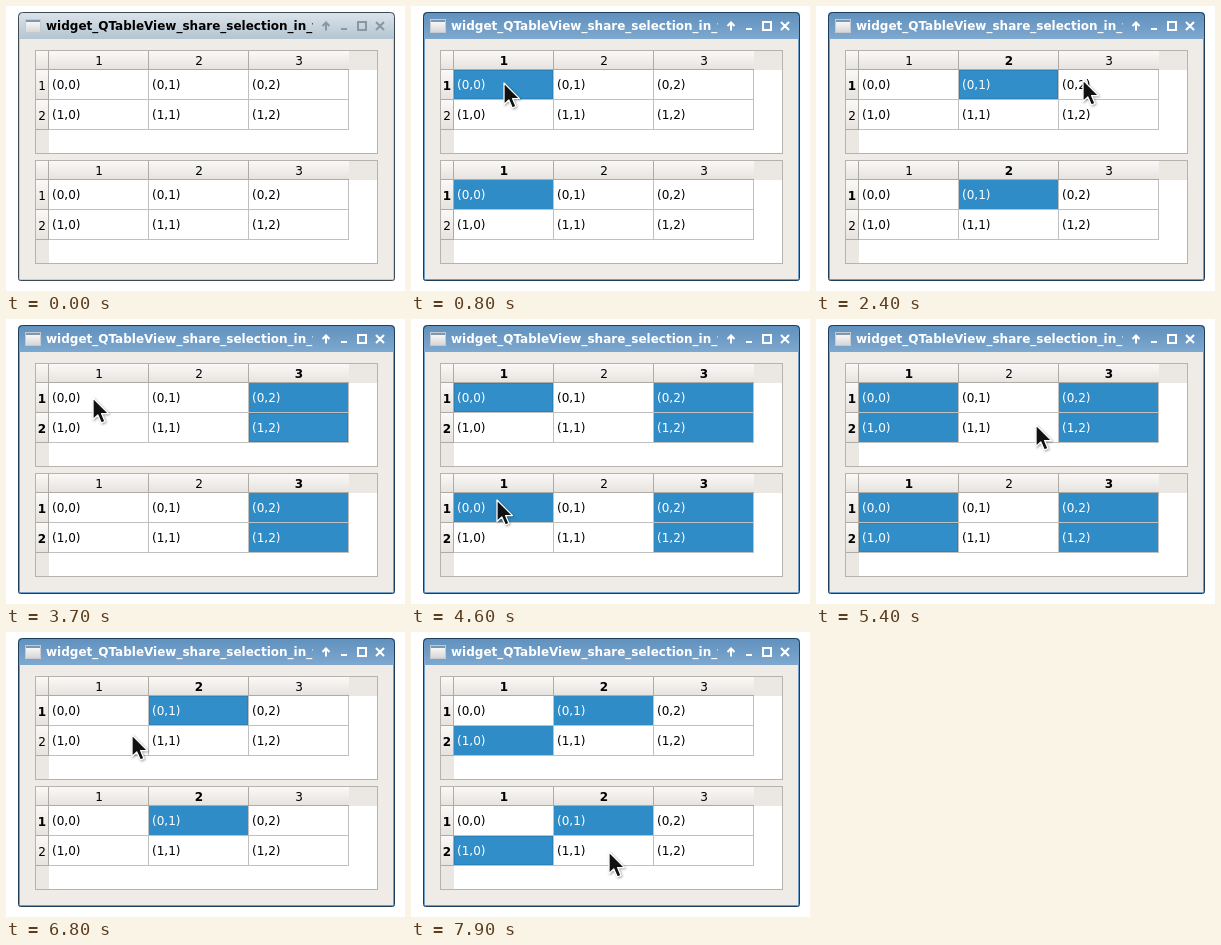
An HTML page for the animation above (8 s loop, 399 by 285 pixels).

```html
<!DOCTYPE html>
<html lang="en">
<head>
<meta charset="utf-8">
<title>Shared selection</title>
<style>
html, body { margin: 0; width: 100%; height: 100%; overflow: hidden; background: #fff; }
svg { display: block; }
text { font: 12px "DejaVu Sans", sans-serif; fill: #000; }
.mid { text-anchor: middle; }
.bold { font-weight: bold; }
.cell { fill: #fff; }
.sel .cell { fill: #308cc6; }
.sel text { fill: #fff; }
.focus .rect, .ring { fill: none; stroke: none; }
.focus .cell { fill: #328ec8; }
.focus .ring { stroke: #2b82ba; }
.frame { fill: none; stroke: #b6b2ae; }
.grid { fill: none; stroke: #c0c0c0; }
.edge { fill: none; stroke: #aeaaa6; }
.bar { fill: url(#idle); }
.rim { fill: none; stroke: #3e4a54; }
.inner { fill: none; stroke: #c3d0da; }
.title { font-weight: bold; fill: #000; }
.btn { fill: none; stroke: #8798a5; stroke-width: 2; }
.active .bar { fill: url(#live); }
.active .rim { stroke: #1e3d5a; }
.active .inner { stroke: #6f9fca; }
.active .title { fill: #fff; }
.active .btn { stroke: #fff; }
#cursor { filter: drop-shadow(1px 1px 1px rgba(0, 0, 0, .35)); }
</style>
</head>
<body>
<svg width="399" height="285" viewBox="0 0 399 285">
  <defs>
    <linearGradient id="idle" x2="0" y2="1">
      <stop stop-color="#dce4ea"/><stop offset="1" stop-color="#b3c5d2"/>
    </linearGradient>
    <linearGradient id="live" x2="0" y2="1">
      <stop stop-color="#5f90bd"/><stop offset="1" stop-color="#7ea8cf"/>
    </linearGradient>
    <linearGradient id="head" x2="0" y2="1">
      <stop stop-color="#faf9f7"/><stop offset="1" stop-color="#e6e2de"/>
    </linearGradient>
    <linearGradient id="pane" x2="0" y2="1">
      <stop stop-color="#fff"/><stop offset="1" stop-color="#d5d5d5"/>
    </linearGradient>
    <clipPath id="caption"><rect x="38" y="8" width="269" height="24"/></clipPath>
  </defs>
  <g id="win">
    <path fill="#efebe7" d="M12 33H389V273Q389 275 387 275H14Q12 275 12 273Z"/>
    <path class="bar" d="M12 33V10Q12 6 16 6H385Q389 6 389 10V33Z"/>
    <path class="inner" d="M13.5 33V273.5H387.5V33"/>
    <path class="rim" d="M12.5 272.5V10.5Q12.5 6.5 16.5 6.5H384.5Q388.5 6.5 388.5 10.5V272.5Q388.5 274.5 386.5 274.5H14.5Q12.5 274.5 12.5 272.5Z"/>
    <rect x="19.5" y="13.5" width="15" height="13" fill="url(#pane)" stroke="#c6cace"/>
    <path d="M20 15H34" stroke="#7f97ad" stroke-width="2"/>
    <g clip-path="url(#caption)">
      <text class="title" x="40" y="24">widget_QTableView_share_selection_in_two_views</text>
    </g>
    <path class="btn" d="M320 24.5V17M316.5 20L320 16.5L323.5 20M335 23H341M352 16H360V24H352ZM370 16L378 24M378 16L370 24"/>
    <g id="tables"></g>
  </g>
  <path id="cursor" d="M1 1V22.5L5.8 18L9.3 26L13 24.4L9.6 16.6H16.5Z" fill="#111" stroke="#fff" stroke-width="1.3" stroke-linejoin="round"/>
</svg>
<script>
const LOOP = 8000, STEP = 100, ACTIVATE = 700;

// time, x, y
const path = [
  [100, 200, 170], [700, 92, 76], [800, 92, 76], [1000, 96, 102],
  [1300, 96, 102], [1500, 160, 80], [1600, 182, 82],
  [1900, 182, 82], [2400, 266, 73], [2700, 266, 73], [2800, 274, 95],
  [3000, 274, 95], [3400, 79, 88], [3500, 79, 88], [3700, 86, 78],
  [4100, 86, 78], [4900, 85, 211], [5000, 85, 212], [5400, 219, 105],
  [5700, 219, 105], [6300, 187, 82], [6500, 187, 82], [6800, 125, 102],
  [7400, 66, 224], [7700, 66, 224], [7900, 197, 219]
];

// time, selected cells (row and column), focused table and cell
const picks = [
  [0, "", ""],
  [ACTIVATE, "00", "0:00"],
  [1100, "10", "0:10"],
  [1800, "01", "0:01"],
  [2800, "02 12", "0:12"],
  [4100, "02 12 00", "0:00"],
  [5000, "02 12 00 10", "1:10"],
  [5600, "02 12 00 10 11", "0:11"],
  [6400, "01", "0:01"],
  [7600, "01 10", "1:10"]
];

const byId = id => document.getElementById(id);
const label = (kind, n, x, y) =>
  `<text class="mid" data-${kind}="${n}" x="${x}" y="${y}">${n + 1}</text>`;

function table(n) {
  let out = `<g transform="translate(0 ${n * 110})">
    <rect x="29" y="44" width="343" height="104" fill="#fff"/>
    <path fill="#ebe7e3" d="M30 45H371V64H43V147H30Z"/>
    <rect x="30" y="45" width="313" height="19" fill="url(#head)"/>`;
  for (let r = 0; r < 2; r++) {
    const y = 64 + r * 30;
    out += `<rect x="30" y="${y}" width="13" height="30" fill="url(#head)"/>`;
    for (let c = 0; c < 3; c++) {
      const x = 43 + c * 100;
      out += `<g data-cell="${r}${c}" data-table="${n}">
        <rect class="cell" x="${x}" y="${y}" width="99" height="29"/>
        <rect class="ring" x="${x + .5}" y="${y + .5}" width="98" height="28"/>
        <text x="${x + 3}" y="${y + 19}">(${r},${c})</text></g>`;
    }
    out += label("row", r, 36, y + 20);
  }
  for (let c = 0; c < 3; c++) out += label("col", c, 93 + c * 100, 59);
  return out + `
    <path class="grid" d="M43 93.5H343M43 123.5H343M142.5 64V124M242.5 64V124M342.5 64V124"/>
    <path class="edge" d="M30 63.5H343M42.5 45V124M142.5 45V64M242.5 45V64M30 93.5H43M30 123.5H43"/>
    <rect class="frame" x="29.5" y="44.5" width="342" height="103"/></g>`;
}

byId("tables").innerHTML = table(0) + table(1);
const cells = document.querySelectorAll("[data-cell]");
const rows = document.querySelectorAll("[data-row]");
const cols = document.querySelectorAll("[data-col]");

// The hand starts fast and slows towards each point.
const ease = k => 1 - (1 - k) ** 1.5;

function cursorAt(t) {
  const i = path.findIndex(p => p[0] > t);
  if (i < 0) return path[path.length - 1].slice(1);
  const [t0, x0, y0] = path[i - 1], [t1, x1, y1] = path[i];
  const k = ease((t - t0) / (t1 - t0));
  return [Math.round(x0 + (x1 - x0) * k), Math.round(y0 + (y1 - y0) * k)];
}

function draw(t) {
  const [, list, focus] = picks.filter(p => p[0] <= t).pop();
  const chosen = list.split(" ");
  byId("win").classList.toggle("active", t >= ACTIVATE);
  for (const el of cells) {
    const { cell, table } = el.dataset;
    el.classList.toggle("sel", chosen.includes(cell));
    el.classList.toggle("focus", focus === `${table}:${cell}`);
  }
  for (const el of rows) el.classList.toggle("bold", chosen.some(c => c[0] === el.dataset.row));
  for (const el of cols) el.classList.toggle("bold", chosen.some(c => c[1] === el.dataset.col));
  const shown = t >= path[0][0];
  byId("cursor").style.display = shown ? "" : "none";
  if (shown) byId("cursor").setAttribute("transform", `translate(${cursorAt(t)})`);
}

const start = performance.now();
let last = -1;
function tick() {
  const t = Math.floor((performance.now() - start) % LOOP / STEP) * STEP;
  if (t !== last) draw(last = t);
  requestAnimationFrame(tick);
}
tick();
</script>
</body>
</html>
```
